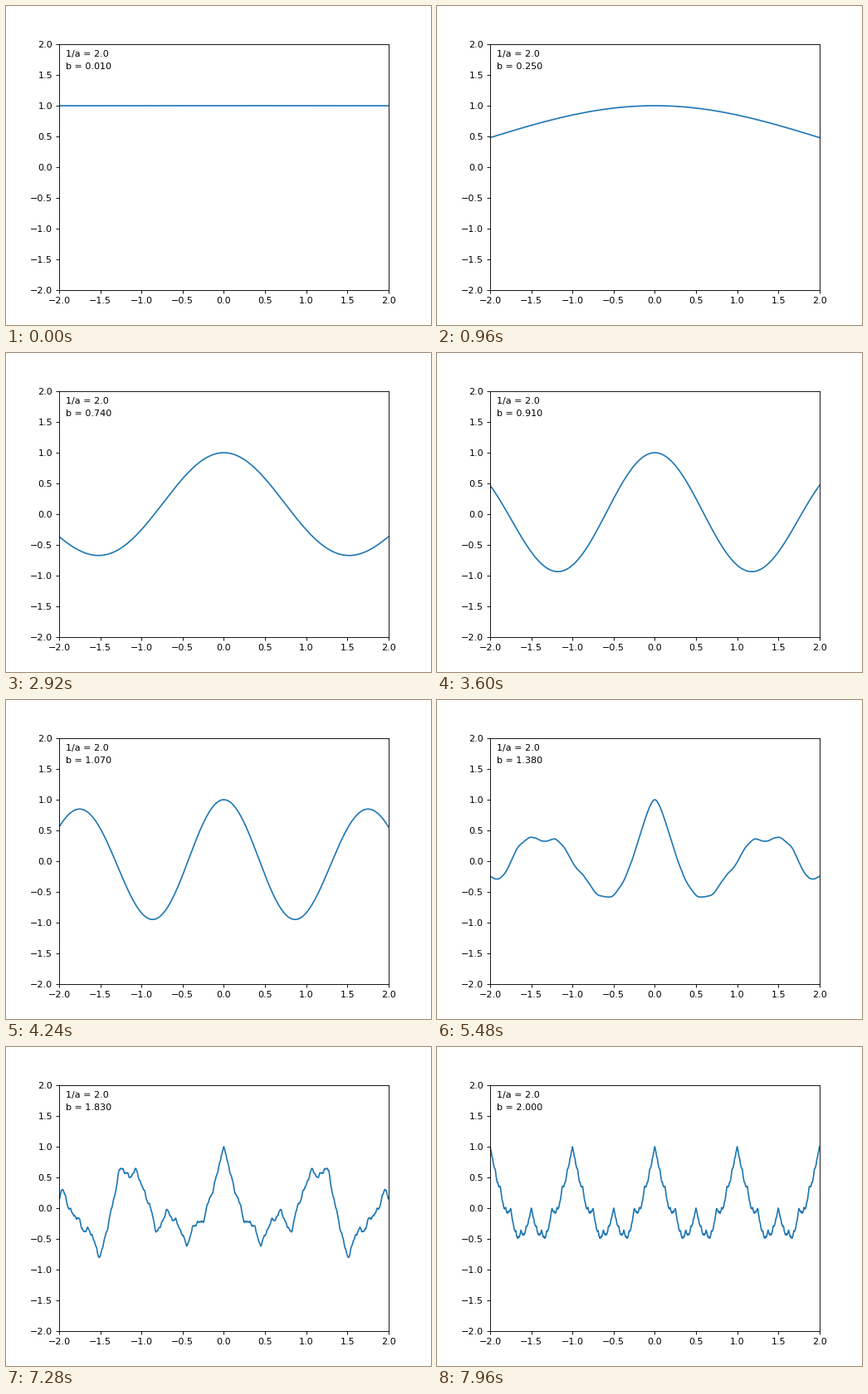
Write a matplotlib script that moves like this. It is 512 by 384 pixels and loops after 8000 ms.

```python
import numpy as np
import matplotlib.pyplot as plt
from matplotlib.animation import FuncAnimation

FRAMES = 200
INTERVAL = 40
INV_A = 2.0
TERMS = 30

x = np.linspace(-2, 2, 1001)
n = np.arange(1, TERMS + 1)[:, None]


def weierstrass(b):
    """Sum of a^n cos(b^n pi x) for n = 1..TERMS."""
    return (INV_A ** -n * np.cos(b ** n * np.pi * x)).sum(axis=0)


fig, ax = plt.subplots(figsize=(6.4, 4.8), dpi=80)
ax.set_xlim(-2, 2)
ax.set_ylim(-2, 2)
line, = ax.plot([], [], lw=1.5, color="#1f77b4")
ax.text(0.02, 0.95, f"1/a = {INV_A:.1f}", transform=ax.transAxes)
b_label = ax.text(0.02, 0.90, "", transform=ax.transAxes)


def update(i):
    b = (i + 1) / 100
    line.set_data(x, weierstrass(b))
    b_label.set_text(f"b = {b:.3f}")
    return line, b_label


anim = FuncAnimation(fig, update, frames=FRAMES, interval=INTERVAL,
                     init_func=lambda: update(0), repeat=True,
                     repeat_delay=0, blit=False)
plt.show()
```
